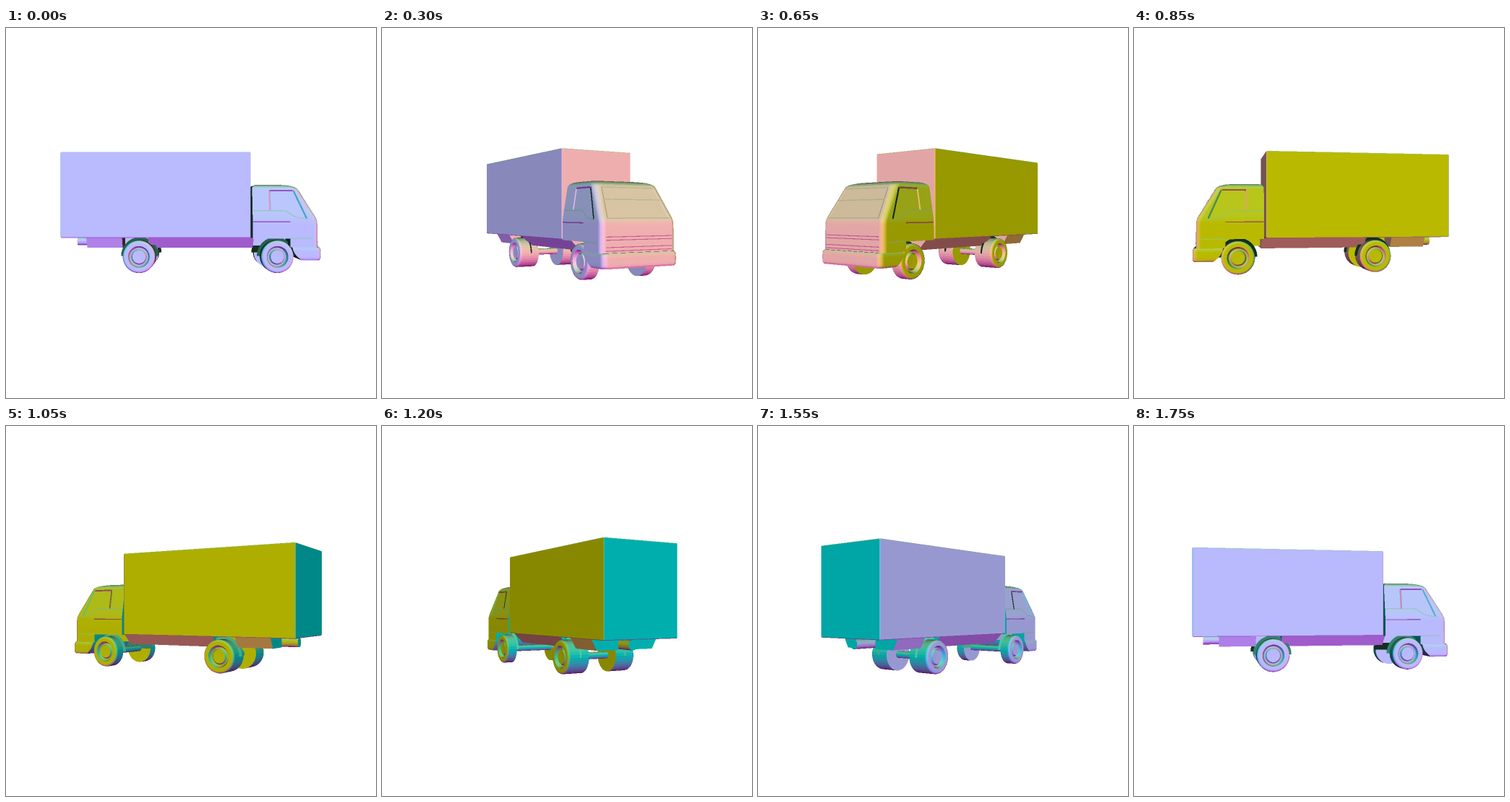
An HTML page with a canvas that plays this animation: 512 px wide and 512 px high, repeating every 1800 ms.

```html
<!DOCTYPE html>
<html lang="en">
<head>
<meta charset="utf-8">
<title>Turning truck</title>
<style>
html, body { margin: 0; width: 100%; height: 100%; overflow: hidden; background: #fff; }
canvas { display: block; width: 512px; height: 512px; }
</style>
</head>
<body>
<canvas id="stage" width="512" height="512"></canvas>
<script>
// Model axes: x forward, y up, z to the truck's right side.
const DIST = 756, CX = 256, CY = 258, STEPS = 36, STEP_MS = 50;
const faces = [];

const sub = (a, b) => a.map((v, i) => v - b[i]);
const dot = (a, b) => a[0] * b[0] + a[1] * b[1] + a[2] * b[2];
const cross = (a, b) => [a[1] * b[2] - a[2] * b[1], a[2] * b[0] - a[0] * b[2], a[0] * b[1] - a[1] * b[0]];
const unit = a => { const l = Math.hypot(...a) || 1; return a.map(v => v / l); };
const mean = pts => [0, 1, 2].map(i => pts.reduce((s, p) => s + p[i], 0) / pts.length);
const range = (n, f) => Array.from({ length: n }, (_, i) => f(i));

function face(pts, n, decal = false) { faces.push({ pts, n: unit(n), decal }); }

// Flat face whose normal points away from the centre of its solid.
function outer(pts, centre) {
  const m = mean(pts);
  let n = [0, 0, 0];
  pts.forEach((p, i) => {
    const c = cross(sub(p, m), sub(pts[(i + 1) % pts.length], m));
    n = n.map((v, k) => v + c[k]);
  });
  face(pts, dot(n, sub(m, centre)) < 0 ? n.map(v => -v) : n);
}

function loft(rings) {
  const centre = mean(rings.flat());
  rings.slice(1).forEach((ring, i) => ring.forEach((p, k) => {
    const j = (k + 1) % ring.length;
    outer([rings[i][k], rings[i][j], ring[j], p], centre);
  }));
  outer(rings[0], centre);
  outer(rings[rings.length - 1], centre);
}

// Stack of floor plans with rounded front corners.
function shell(rows) {
  loft(rows.map(({ y, back, front, w, r }) => {
    const arc = range(7, i => {
      const a = i * Math.PI / 12;
      return [front - r + r * Math.sin(a), y, w - r + r * Math.cos(a)];
    });
    const mirror = arc.map(([x, yy, z]) => [x, yy, -z]).reverse();
    return [[back, y, w], ...arc, ...mirror, [back, y, -w]];
  }));
}

const prismX = (x0, x1, zy) => loft([x0, x1].map(x => zy.map(([z, y]) => [x, y, z])));

function bevelBox(lo, hi, r) {
  const mid = mean([lo, hi]), half = sub(hi, mid);
  const corner = (sg, main) => mid.map((m, i) => m + sg[i] * (half[i] - (i === main ? 0 : r)));
  const put = (a, sa, b, sb, c, sc) => { const s = []; s[a] = sa; s[b] = sb; s[c] = sc; return s; };
  for (let a = 0; a < 3; a++) {
    const b = (a + 1) % 3, c = (a + 2) % 3;
    for (const s of [-1, 1]) {
      outer([[-1, -1], [1, -1], [1, 1], [-1, 1]].map(([p, q]) => corner(put(a, s, b, p, c, q), a)), mid);
      for (const t of [-1, 1]) {
        const e = q => put(a, s, b, t, c, q);
        outer([corner(e(-1), a), corner(e(1), a), corner(e(1), b), corner(e(-1), b)], mid);
      }
    }
  }
}

// Solid of revolution around z; profile entries are [radius, z].
function lathe(cx, cy, profile, side) {
  const N = 36, spin = (r, z, a) => [cx + r * Math.cos(a), cy + r * Math.sin(a), z * side];
  profile.slice(1).forEach(([r1, z1], i) => {
    const [r0, z0] = profile[i], nr = z1 - z0;
    for (let k = 0; k < N; k++) {
      const a = k * 2 * Math.PI / N, b = a + 2 * Math.PI / N, m = (a + b) / 2;
      face([spin(r0, z0, a), spin(r0, z0, b), spin(r1, z1, b), spin(r1, z1, a)],
        [nr * Math.cos(m), nr * Math.sin(m), (r0 - r1) * side]);
    }
  });
}

const AXLE_Y = -55, TYRE = 21.2, FACE_Z = 49;

function wheel(x, inner) {
  const shoulder = range(5, i => {
    const a = i * Math.PI / 8;
    return [TYRE - 3 * (1 - Math.cos(a)), FACE_Z - 3 * (1 - Math.sin(a))];
  });
  const groove = range(7, i => [14 - i * 0.9, FACE_Z - i * 0.3 - 4 * Math.sin(i * Math.PI / 6)]);
  const profile = [[0, inner], [TYRE, inner], ...shoulder, ...groove, [0, FACE_Z - 2]];
  const arch = range(17, i => [x + 25 * Math.cos(i * Math.PI / 16), AXLE_Y + 25 * Math.sin(i * Math.PI / 16)]);
  for (const side of [1, -1]) {
    lathe(x, AXLE_Y, profile, side);
    face(arch.map(([ax, ay]) => [ax, ay, 33 * side]), [-0.8, 0.6, 0.15 * side], true);
  }
  lathe(x, AXLE_Y, [[4.5, -inner], [4.5, inner]], 1);
}

// Cab outline at a height: upright below the belt, leaning in above, rounded at the roof.
const SILL = -31, ROOF = 39.3, BEND = 33;
function cabRow(y) {
  const d = y + 7, lean = (d + Math.hypot(d, 3)) / 2;
  const u = Math.max(0, (y - BEND) / (ROOF - BEND)), round = 1 - Math.sqrt(Math.max(0, 1 - u * u));
  return {
    y, back: 79.5 + 7 * round, front: 164.2 - 0.6 * lean - 18 * round,
    w: 52.2 - 0.175 * lean - 12 * round, r: 6 + 0.05 * lean + 5 * round
  };
}

// Thin trim along both cab sides, given as x, y pairs.
function sideLine(pts, n, width = 1.3) {
  for (const s of [1, -1]) pts.slice(1).forEach(([x1, y1], i) => {
    const [x0, y0] = pts[i], l = Math.hypot(x1 - x0, y1 - y0) * 2 / width;
    const ox = (y0 - y1) / l, oy = (x1 - x0) / l;
    const put = (x, y) => [x, y, s * (cabRow(y).w + 0.4)];
    face([put(x0 + ox, y0 + oy), put(x1 + ox, y1 + oy), put(x1 - ox, y1 - oy), put(x0 - ox, y0 - oy)],
      [n[0], n[1], n[2] * s], true);
  });
}

function frontLine(y, n, inset = 6, h = 1.2) {
  const put = (yy, s) => [cabRow(yy).front + 0.4, yy, s * (cabRow(yy).w - inset)];
  face([put(y - h / 2, -1), put(y - h / 2, 1), put(y + h / 2, 1), put(y + h / 2, -1)], n, true);
}

function buildCab() {
  shell([SILL, -20, ...range(8, i => -14 + i * 2), BEND, ...range(6, i => BEND + (ROOF - BEND) * Math.sin((i + 1) * Math.PI / 12))].map(cabRow));
  shell([-42.5, SILL].map(y => ({ ...cabRow(y), back: 128 })));
  shell(range(9, i => {
    const v = i / 8, inset = 1.5 * Math.abs(2 * v - 1) ** 6;
    return { y: -59.3 + 17 * v, back: 131 + 12 * (1 - v) ** 2, front: 168.4 - inset, w: 52.2 - inset, r: 6 };
  }));

  const up = [0, 0.75, 0.66], down = [0, -0.75, 0.66], fore = [0.7, 0, 0.7], aft = [-0.75, 0.1, 0.65];
  sideLine([[102, 31], [132, 31]], down, 2);
  sideLine([[102, 31], [102, 5]], fore, 2.4);
  sideLine([[133, 31], [149, -5]], aft, 2.2);
  sideLine([[80, 5], [122, 4.7], [135, -3.5], [151, -6]], up);
  sideLine([[80, -9.5], [128, -9.5]], down);
  sideLine([[128, SILL], [157, SILL]], up);

  const ledge = [0.65, 0.76, 0], lip = [0.75, -0.66, 0];
  for (const y of [31, 17, -4]) frontLine(y, ledge, 8);
  for (const y of [-24.5, -28, -36, -40]) frontLine(y, lip, 6, 0.9);
  for (const s of [1, -1]) {
    const put = (y, d) => [cabRow(y).front + 0.4, y, s * (cabRow(y).w - 8 - d)];
    face([put(31, 0), put(31, 1.2), put(-4, 1.2), put(-4, 0)], [0.8, 0.4, -0.4 * s], true);
  }
}

function buildChassis() {
  const top = -30;
  for (const s of [1, -1])
    prismX(-136, -89.5, [[10, top], [47, top], [39.5, -43.5], [10, -43.5]].map(([z, y]) => [z * s, y]));
  prismX(-56, 82, [[43, top], [29, -44.3], [-29, -44.3], [-43, top]]);
  prismX(-110, 132, [[14, top], [14, -42], [-14, -42], [-14, top]]);
  const ring = range(16, i => i * Math.PI / 8);
  prismX(-157, -88, ring.map(a => [6 * Math.cos(a) - 4.5, 6 * Math.sin(a) - 37]));
  wheel(112, 34);
  wheel(-67.5, 20);
}

// Depth-buffered drawing at double size over the area the truck sweeps.
const S = 2, LEFT = 64, TOP = 144, W = 384 * S, H = 216 * S;
const stage = document.getElementById("stage").getContext("2d");
const big = document.createElement("canvas");
big.width = W; big.height = H;
const bigCtx = big.getContext("2d");
const image = bigCtx.createImageData(W, H);
const pixels = new Uint32Array(image.data.buffer), depth = new Float32Array(W * H);

// The normal is the linear colour, lit from the camera.
function shade(n, facing) {
  const light = Math.max(0.03, facing);
  const [r, g, b] = n.map(v => Math.round(255 * ((v + 1) / 2 * light) ** (1 / 2.2)));
  return (255 << 24 | b << 16 | g << 8 | r) >>> 0;
}

function triangle(a, b, c, colour) {
  const area = (b[0] - a[0]) * (c[1] - a[1]) - (b[1] - a[1]) * (c[0] - a[0]);
  if (Math.abs(area) < 1e-6) return;
  const qx = ((b[2] - a[2]) * (c[1] - a[1]) - (c[2] - a[2]) * (b[1] - a[1])) / area;
  const qy = ((c[2] - a[2]) * (b[0] - a[0]) - (b[2] - a[2]) * (c[0] - a[0])) / area;
  const y0 = Math.max(0, Math.ceil(Math.min(a[1], b[1], c[1]) - 0.5));
  const y1 = Math.min(H - 1, Math.floor(Math.max(a[1], b[1], c[1]) - 0.5));
  for (let y = y0; y <= y1; y++) {
    const v = y + 0.5;
    let lo = Infinity, hi = -Infinity;
    for (const [p, q] of [[a, b], [b, c], [c, a]]) {
      if ((p[1] <= v) === (q[1] <= v)) continue;
      const x = p[0] + (v - p[1]) / (q[1] - p[1]) * (q[0] - p[0]);
      lo = Math.min(lo, x); hi = Math.max(hi, x);
    }
    const x0 = Math.max(0, Math.ceil(lo - 0.5)), x1 = Math.min(W, Math.ceil(hi - 0.5));
    for (let x = x0; x < x1; x++) {
      const q = a[2] + (x + 0.5 - a[0]) * qx + (v - a[1]) * qy, i = y * W + x;
      if (q > depth[i]) { depth[i] = q; pixels[i] = colour; }
    }
  }
}

function draw(step) {
  const angle = step * 2 * Math.PI / STEPS, c = Math.cos(angle), s = Math.sin(angle);
  const eye = [DIST * s, 0, DIST * c];
  pixels.fill(0xffffffff);
  depth.fill(0);
  for (const { pts, n, decal } of faces) {
    if (!decal && dot(n, sub(eye, pts[0])) <= 0) continue;
    const p = pts.map(([x, y, z]) => {
      const k = DIST / (DIST - x * s - z * c);
      return [(CX + (x * c - z * s) * k - LEFT) * S, (CY - y * k - TOP) * S, k];
    });
    const colour = shade(n, n[0] * s + n[2] * c);
    for (let i = 2; i < p.length; i++) triangle(p[0], p[i - 1], p[i], colour);
  }
  bigCtx.putImageData(image, 0, 0);
  stage.fillStyle = "#fff";
  stage.fillRect(0, 0, 512, 512);
  stage.drawImage(big, LEFT, TOP, W / S, H / S);
}

bevelBox([-168.3, -30.3, -51.8], [77, 80.7, 51.8], 0.8);
buildCab();
buildChassis();
const start = performance.now();
let shown = -1;
function tick() {
  const step = Math.floor((performance.now() - start) / STEP_MS) % STEPS;
  if (step !== shown) draw(shown = step);
  requestAnimationFrame(tick);
}
tick();
</script>
</body>
</html>
```
